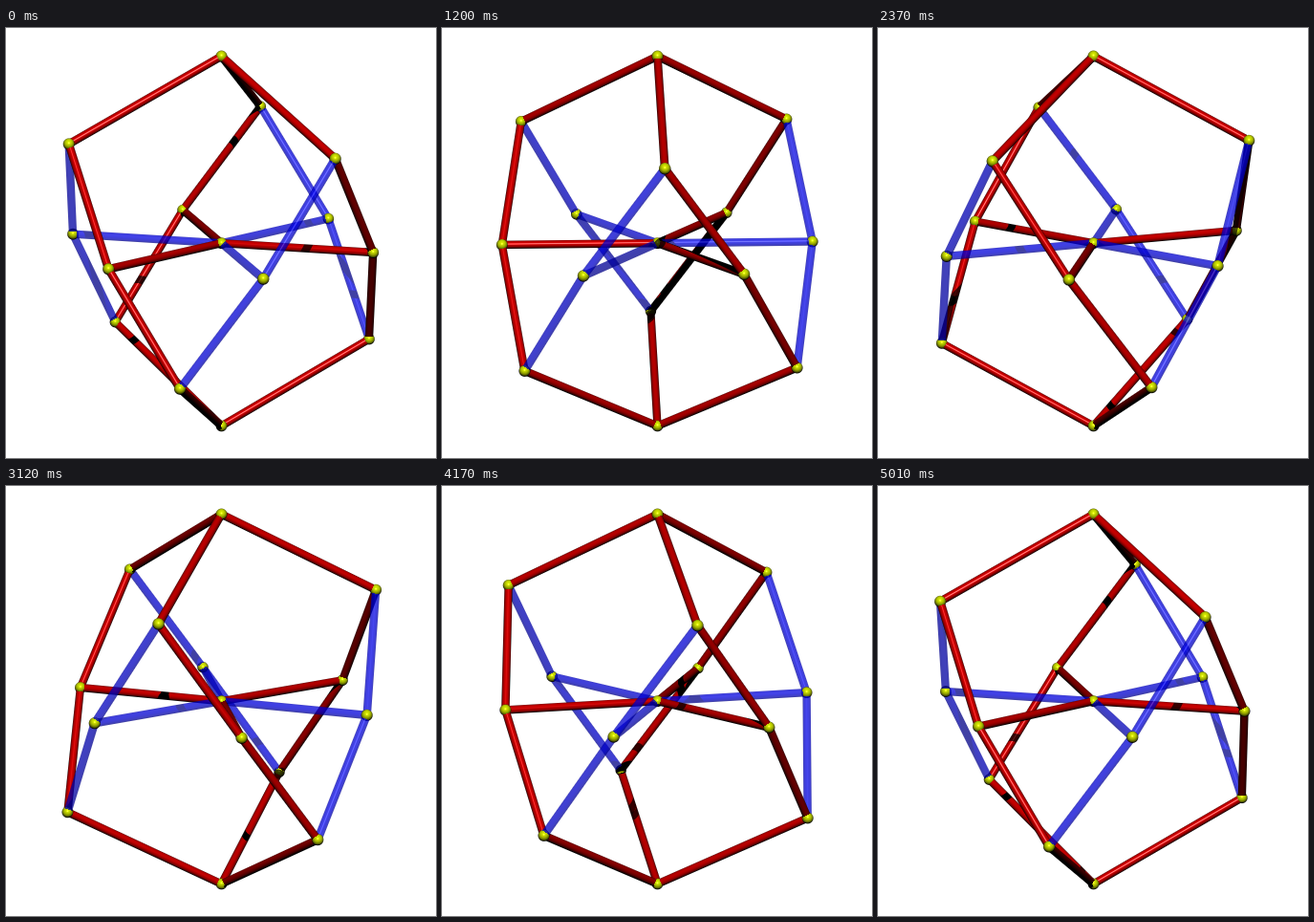
Write an HTML page with a canvas that moves like this. It is 450 by 450 pixels and loops after 5040 ms.

```html
<!DOCTYPE html>
<html>
<head>
<meta charset="utf-8">
<style>
  html, body { margin: 0; width: 100%; height: 100%; overflow: hidden; background: #fff; }
  canvas { display: block; }
</style>
</head>
<body>
<canvas id="stage" width="450" height="450"></canvas>
<script>
const SIZE = 450, CX = 225, CY = 224.7;
const STEP_MS = 30, STEPS = 168, START = 45, STEP_DEG = 1.06;
const CAMERA = 4026, PITCH = 13.24 * Math.PI / 180;
const RING = 162.6, POLE = 198.7, LEVEL = 114.7;
const TUBE_R = 4.2, BALL_R = 5.9, CHUNKS = 16;

const RED = { rgb: [205, 0, 0], alpha: 1, floor: 0, gloss: 0.5 };
const BLUE = { rgb: [0, 0, 222], alpha: 0.75, floor: 0.6, gloss: 0.3 };
const YELLOW = { rgb: [212, 232, 0], alpha: 1, floor: 0, gloss: 0.3 };

const unit = v => { const d = Math.hypot(...v); return v.map(c => c / d); };
const dot = (a, b) => a[0] * b[0] + a[1] * b[1] + a[2] * b[2];
const mix = (a, b, t) => a + (b - a) * t;
const clamp = x => Math.max(0, Math.min(1, x));

const LIGHT = unit([0, 0.38, 1]);
const HALF = unit([0, LIGHT[1], LIGHT[2] + 1]);

// Points as [azimuth, radius, height]: centre, poles, three upper, three lower, six middle.
const points = [[0, 0, 0], [0, 0, POLE], [0, 0, -POLE]];
for (let k = 0; k < 3; k++) points.push([120 * k, RING, LEVEL]);
for (let k = 0; k < 3; k++) points.push([180 + 120 * k, RING, -LEVEL]);
for (let k = 0; k < 6; k++) points.push([30 + 60 * k, RING, 0]);

const edges = [];
const middle = k => 9 + k % 6;
const joinMiddle = (from, k) => edges.push([from, middle(k), k % 2 ? BLUE : RED]);
for (let k = 0; k < 3; k++) {
  edges.push([1, 3 + k, RED], [2, 6 + k, RED]);
  joinMiddle(3 + k, 2 * k);
  joinMiddle(3 + k, 2 * k + 5);
  joinMiddle(6 + k, 2 * k + 2);
  joinMiddle(6 + k, 2 * k + 3);
}
for (let k = 0; k < 6; k++) joinMiddle(0, k);

const ctx = document.getElementById('stage').getContext('2d');
const image = ctx.createImageData(SIZE, SIZE);
const pix = image.data;
let casters = [];

function place([azimuth, radius, height], turn) {
  const a = (azimuth + turn) * Math.PI / 180;
  const z = radius * Math.cos(a), c = Math.cos(PITCH), s = Math.sin(PITCH);
  const pos = [radius * Math.sin(a), height * c - z * s, height * s + z * c];
  const scale = 1 / (1 - pos[2] / CAMERA);
  return { pos, scale, x: CX + pos[0] * scale, y: CY - pos[1] * scale };
}

// Coordinates across and along the light.
const toLight = p => [p[0], p[1] * LIGHT[2] - p[2] * LIGHT[1], dot(p, LIGHT)];

function addCaster(p, q, r, opacity) {
  const a = toLight(p), b = toLight(q);
  const d = b.map((c, i) => c - a[i]);
  const caster = { a, d, r, opacity, len2: d[0] * d[0] + d[1] * d[1] || 1 };
  casters.push(caster);
  return caster;
}

function lightAt(p, self) {
  const [x, y, depth] = toLight(p);
  let lit = 1;
  for (const c of casters) {
    if (c === self) continue;
    const ox = x - c.a[0], oy = y - c.a[1];
    const t = clamp((ox * c.d[0] + oy * c.d[1]) / c.len2);
    const ex = ox - t * c.d[0], ey = oy - t * c.d[1], reach = c.r + 0.5;
    const e2 = ex * ex + ey * ey;
    if (e2 > reach * reach || c.a[2] + t * c.d[2] < depth + 1) continue;
    lit *= 1 - c.opacity * clamp(reach - Math.sqrt(e2));
    if (lit < 0.01) return 0;
  }
  return lit;
}

function paint(x, y, cover, pos, normal, look, self) {
  const facing = Math.max(0, dot(normal, LIGHT));
  const lit = facing ? lightAt(pos, self) : 0;
  const diffuse = mix(look.floor, 1, facing * lit);
  const shine = look.gloss * lit * Math.max(0, dot(normal, HALF)) ** 90;
  const alpha = cover * look.alpha, i = (y * SIZE + x) * 4;
  for (let k = 0; k < 3; k++)
    pix[i + k] = mix(pix[i + k], Math.min(255, look.rgb[k] * diffuse + 255 * shine), alpha);
}

function eachPixel(x0, y0, x1, y1, fn) {
  for (let y = Math.floor(y0); y <= Math.ceil(y1); y++)
    for (let x = Math.floor(x0); x <= Math.ceil(x1); x++) fn(x, y);
}

function drawBall(v, self) {
  const r = BALL_R * v.scale, m = r + 1;
  eachPixel(v.x - m, v.y - m, v.x + m, v.y + m, (x, y) => {
    const dx = x - v.x, dy = v.y - y, d = Math.hypot(dx, dy);
    const cover = clamp(r + 0.5 - d);
    if (!cover) return;
    const k = 1 / Math.max(r, d);
    const n = [dx * k, dy * k, Math.sqrt(Math.max(0, 1 - d * d * k * k))];
    paint(x, y, cover, v.pos.map((c, i) => c + n[i] * BALL_R), n, YELLOW, self);
  });
}

function drawChunk(p, q, look, self, from, to) {
  const dx = q.x - p.x, dy = p.y - q.y, len = Math.hypot(dx, dy);
  const axis = unit(q.pos.map((c, i) => c - p.pos[i]));
  const tilt = axis[2], flat = Math.sqrt(1 - tilt * tilt);
  const ux = dx / len, uy = dy / len;
  const ax = mix(p.x, q.x, from), bx = mix(p.x, q.x, to);
  const ay = mix(p.y, q.y, from), by = mix(p.y, q.y, to);
  const r = TUBE_R * mix(p.scale, q.scale, from), m = r + 1;
  const inBall = (v, pos) =>
    Math.hypot(pos[0] - v.pos[0], pos[1] - v.pos[1], pos[2] - v.pos[2]) < BALL_R;
  eachPixel(Math.min(ax, bx) - m, Math.min(ay, by) - m, Math.max(ax, bx) + m, Math.max(ay, by) + m, (x, y) => {
    const ox = x - p.x, oy = p.y - y;
    const t = (ox * ux + oy * uy) / len;
    if (t < from || t >= to) return;
    const side = oy * ux - ox * uy;
    const cover = clamp(r + 0.5 - Math.abs(side));
    if (!cover) return;
    const u = Math.max(-1, Math.min(1, side / r)), w = Math.sqrt(1 - u * u);
    const n = [-uy * u - tilt * ux * w, ux * u - tilt * uy * w, flat * w];
    const pos = n.map((c, i) => mix(p.pos[i], q.pos[i], t) + c * TUBE_R);
    if (inBall(p, pos) || inBall(q, pos)) return;
    paint(x, y, cover, pos, n, look, self);
  });
}

function draw(step) {
  const turn = START - STEP_DEG * Math.min(step, STEPS - step);
  const verts = points.map(v => place(v, turn));
  const parts = [];
  casters = [];
  for (const v of verts) {
    const self = addCaster(v.pos, v.pos, BALL_R, 1);
    parts.push({ z: v.pos[2], draw: () => drawBall(v, self) });
  }
  for (const [i, j, look] of edges) {
    const p = verts[i], q = verts[j];
    const self = addCaster(p.pos, q.pos, TUBE_R, look === BLUE ? 0.72 : 1);
    for (let k = 0; k < CHUNKS; k++) {
      const z = mix(p.pos[2], q.pos[2], (k + 0.5) / CHUNKS);
      parts.push({ z, draw: () => drawChunk(p, q, look, self, k / CHUNKS, (k + 1) / CHUNKS) });
    }
  }
  pix.fill(255);
  parts.sort((a, b) => a.z - b.z).forEach(part => part.draw());
  ctx.putImageData(image, 0, 0);
}

const began = performance.now();
let shown = -1;
function tick() {
  const step = Math.floor((performance.now() - began) / STEP_MS) % STEPS;
  if (step !== shown) draw(shown = step);
  requestAnimationFrame(tick);
}
tick();
</script>
</body>
</html>
```
